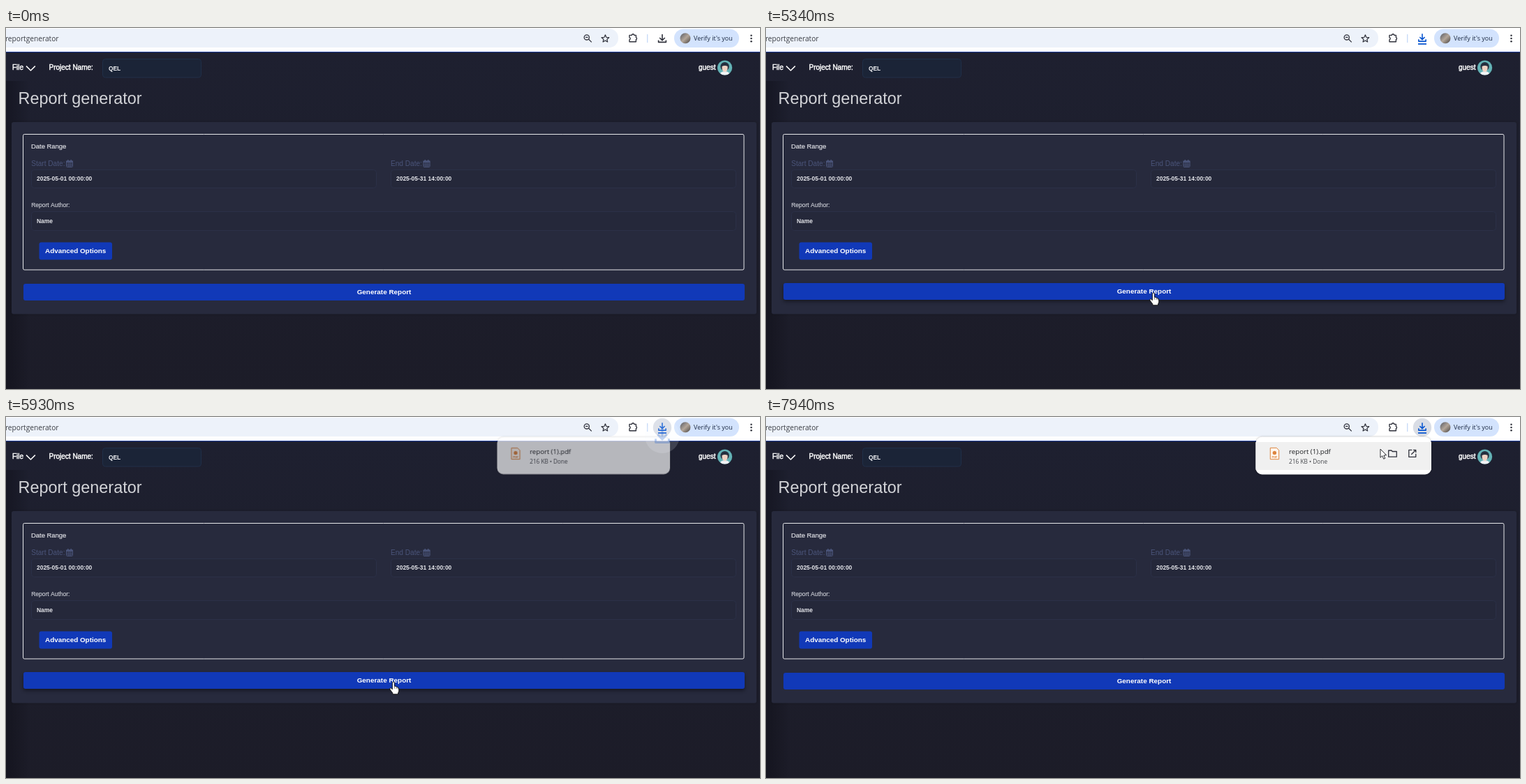
These frames come from a looping animation (1080x518 px, 8 s). An HTML page with a canvas:

```html
<!DOCTYPE html>
<html lang="en">
<head>
<meta charset="utf-8">
<title>Report generator</title>
<style>
  html, body { margin: 0; width: 100%; height: 100%; overflow: hidden; background: #1c1d29; }
  canvas { display: block; }
</style>
</head>
<body>
<canvas id="stage" width="1080" height="518"></canvas>
<script>
const W = 1080, H = 518, LOOP = 8000;
const ARIAL = '"Liberation Sans", Arial, sans-serif';
const UI = '"Open Sans", "Noto Sans", sans-serif';
const BLUE = '#0b57d0', INK = '#30323c', BUTTON = '#1139b8';

const stage = document.getElementById('stage').getContext('2d');
const pageLayer = makeLayer(), popLayer = makeLayer();
let g = stage;

function makeLayer() {
  const c = document.createElement('canvas');
  c.width = W;
  c.height = H;
  return c.getContext('2d');
}

// drawing helpers
function box(x, y, w, h, r, fill, stroke, lw = 1) {
  g.beginPath();
  g.roundRect(x, y, w, h, r);
  paint(fill, stroke, lw);
}
function disc(x, y, r, fill, stroke, lw) {
  g.beginPath();
  g.arc(x, y, r, 0, 7);
  paint(fill, stroke, lw);
}
function paint(fill, stroke, lw = 1) {
  if (fill) { g.fillStyle = fill; g.fill(); }
  if (stroke) { g.strokeStyle = stroke; g.lineWidth = lw; g.stroke(); }
}
function shape(d, x, y, s, fill, stroke, lw) {
  g.save();
  g.translate(x, y);
  g.scale(s, s);
  g.lineJoin = 'round';
  const p = new Path2D(d);
  if (fill) { g.fillStyle = fill; g.fill(p); }
  if (stroke) { g.strokeStyle = stroke; g.lineWidth = lw; g.stroke(p); }
  g.restore();
}
function text(str, x, y, font, color, { align = 'left', thick = 0 } = {}) {
  g.font = font;
  g.textAlign = align;
  g.fillStyle = color;
  g.fillText(str, x, y);
  if (thick) {
    g.strokeStyle = color;
    g.lineWidth = thick;
    g.strokeText(str, x, y);
  }
}

// timing helpers
const clamp = v => Math.max(0, Math.min(1, v));
const range = (a, b) => Array.from({ length: (b - a) / 100 + 1 }, (_, i) => a + i * 100);
const STEPS = [0, 1190, ...range(1310, 1710), ...range(5340, 5940), 6030, 6220,
  ...range(6340, 7340), ...range(7640, 7940)];
const snap = t => STEPS.reduce((a, s) => (s <= t ? s : a), 0);

function track(keys, t) {
  let i = 0;
  while (i < keys.length - 2 && t >= keys[i + 1][0]) i++;
  const [ta, xa, ya] = keys[i], [tb, xb, yb] = keys[i + 1];
  const p = clamp((t - ta) / (tb - ta));
  return [xa + (xb - xa) * p, ya + (yb - ya) * p];
}

const POINTER = [
  [1190, 600, 438], [1310, 576, 412], [1410, 562, 393], [1510, 556, 384], [1710, 555, 380],
  [6030, 555, 380], [6220, 574, 370], [6340, 628, 336], [6440, 690, 270], [6540, 735, 200],
  [6640, 762, 144], [6740, 775, 108], [6840, 779, 87], [6940, 779, 78], [7040, 779, 66],
  [7140, 779, 57], [7240, 779, 55], [7540, 779, 55], [7640, 793, 54], [7740, 829, 50],
  [7840, 862, 47], [7940, 880, 46]
];

function downloadIcon(x, y, s, color, lw = 1.6) {
  shape('M0-6V2.6M-3.8-1L0 2.8L3.8-1M-5.4 2.4V5.4H5.4V2.4', x, y, s, null, color, lw);
}

function toolbar() {
  g.fillStyle = '#fff';
  g.fillRect(0, 0, W, 34);
  box(-20, 1, 897, 27, 13, '#edf2fa');
  text('reportgenerator', 75.5, 19, `10.2px ${UI}`, '#3a3d44', { align: 'right' });

  disc(831.8, 13.4, 3.6, null, INK, 1.3);
  shape('M2.6 2.6L7 7M-1.8 0H1.8', 831.8, 13.4, 1, null, INK, 1.2);
  let star = 'M';
  for (let i = 0; i < 10; i++) {
    const a = i * Math.PI / 5, r = i % 2 ? 2.5 : 5.6;
    star += `${(r * Math.sin(a)).toFixed(2)} ${(-r * Math.cos(a)).toFixed(2)}${i < 9 ? 'L' : 'Z'}`;
  }
  shape(star, 858.4, 15.4, 1, null, INK, 1.2);
  shape('M-5-4H-1.6A1.7 1.7 0 0 1 1.8-4H4.4V-1A1.7 1.7 0 0 1 4.4 2.2V5.4H-5V2.4A1.8 1.8 0 0 0-5-1Z',
    898, 14.4, 1, null, INK, 1.4);
  g.fillStyle = '#c9dbf8';
  g.fillRect(918, 9, 1.4, 12);

  box(957, 1.5, 93, 26.5, 13.2, '#d3e3fd');
  const photo = g.createLinearGradient(966, 8, 980, 22);
  photo.addColorStop(0, '#5d6068');
  photo.addColorStop(0.5, '#b3a598');
  photo.addColorStop(1, '#4a4644');
  disc(973, 14.8, 7.5, photo);
  text("Verify it's you", 985, 18.2, `500 9.05px ${UI}`, '#1d2b45');
  for (const y of [10.8, 15, 19.2]) disc(1067.5, y, 1.25, INK);
}

function calendar(x, y) {
  const c = '#4a5479';
  box(x + 0.5, y + 1.5, 9, 8.5, 1, null, c);
  g.fillStyle = c;
  g.fillRect(x, y + 1, 10, 2.6);
  g.fillRect(x + 2, y - 0.5, 1.6, 3);
  g.fillRect(x + 6.4, y - 0.5, 1.6, 3);
  for (const d of [3, 5, 7]) g.fillRect(x + d - 0.3, y + 3, 0.7, 7);
  for (const d of [5.4, 7.6]) g.fillRect(x, y + d, 10, 0.7);
}

function avatar() {
  g.save();
  disc(1029.6, 57, 10.6, '#63b2b5');
  g.clip();
  shape('M-8 12Q-7 5 0 5Q7 5 8 12Z', 1029.6, 57, 1, '#f0f2f4');
  disc(1029.6, 55.2, 6.2, '#25303f');
  shape('M-4-1Q0-3 4-1V2Q3.5 6.5 0 7Q-3.5 6.5-4 2Z', 1029.6, 56, 1, '#efd3c4');
  g.restore();
}

function field(x, y, w, h, value) {
  box(x + 0.5, y + 0.5, w, h, 4, '#25283a', '#2b3047');
  text(value, x + 8, y + h / 2 + 3.2, `bold 8.45px ${ARIAL}`, '#e4e5ea');
}

function page() {
  const bg = g.createLinearGradient(0, 34, 0, H);
  bg.addColorStop(0, '#1e2030');
  bg.addColorStop(1, '#1c1c28');
  g.fillStyle = bg;
  g.fillRect(0, 0, W, H);
  const edge = g.createLinearGradient(0, 0, 34, 0);
  edge.addColorStop(0, 'rgba(10,10,18,.42)');
  edge.addColorStop(1, 'rgba(10,10,18,0)');
  g.fillStyle = edge;
  g.fillRect(0, 76, 34, H - 76);
  toolbar();
  g.fillStyle = '#1c3b9b';
  g.fillRect(0, 34, W, 1);

  const nav = `10px ${ARIAL}`;
  text('File', 9, 60.3, nav, '#fff', { thick: 0.45 });
  shape('M0 0L6.4 6.4L12.8 0', 29, 54.6, 1, null, '#fff', 1.5);
  text('Project Name:', 61.5, 60.3, nav, '#fff', { thick: 0.45 });
  box(138.5, 44.5, 141, 26.5, 4, '#1b2437', '#202f48');
  text('QEL', 147, 61, `bold 8.4px ${ARIAL}`, '#f0f1f4');
  text('guest', 1016.5, 60.3, nav, '#fff', { align: 'right', thick: 0.45 });
  avatar();
  text('Report generator', 17.6, 109.4, `23.4px ${ARIAL}`, '#d3d4d8');

  g.save();
  g.shadowColor = 'rgba(0,0,0,.2)';
  g.shadowBlur = 5;
  box(8, 135, 1067, 275.5, 3, '#272a3d');
  g.restore();
  box(24.5, 152.5, 1032.5, 194.5, 2, null, '#e6e7ea');
  text('Date Range', 36, 173, `9.45px ${ARIAL}`, '#dfe0e5', { thick: 0.2 });
  const label = `10.1px ${ARIAL}`;
  text('Start Date:', 36.2, 198, label, '#4a5479');
  calendar(86, 189.5);
  text('End Date:', 551, 198, label, '#4a5479');
  calendar(597.5, 189.5);
  field(36, 203, 494, 26, '2025-05-01 00:00:00');
  field(551, 203, 494, 26, '2025-05-31 14:00:00');
  text('Report Author:', 36.2, 256.8, `8.5px ${ARIAL}`, '#c6c8d0', { thick: 0.2 });
  field(36, 263, 1009, 27, 'Name');
  box(47.5, 307.5, 104.5, 25, 3, BUTTON);
  text('Advanced Options', 56, 322.5, `bold 9.9px ${ARIAL}`, '#fff');
}

function generateButton(lift) {
  g.save();
  if (lift) {
    g.shadowColor = `rgba(0,0,0,${0.4 * lift})`;
    g.shadowBlur = 5;
    g.shadowOffsetY = 3;
  }
  box(25, 367 - lift, 1033, 24, 3, BUTTON);
  g.restore();
  text('Generate Report', 541.5, 382 - lift, `bold 9.93px ${ARIAL}`, '#fff', { align: 'center' });
}

function popup(hover) {
  g.clearRect(0, 0, W, H);
  g.save();
  g.shadowColor = 'rgba(0,0,0,.3)';
  g.shadowBlur = 3;
  box(701.5, 28.5, 251.5, 54, 9, '#fff');
  g.restore();
  if (hover) {
    const v = Math.round(255 - 15 * hover);
    g.fillStyle = `rgb(${v},${v},${v})`;
    g.fillRect(701.5, 36, 251.5, 40);
  }
  const orange = '#dd853f';
  shape('M0 0H9L12.4 3.4V16.4H0Z', 722.3, 44.3, 1, '#fff6ee', orange, 1);
  disc(728.4, 51.4, 2.7, orange);
  text('PDF', 728.5, 59, `bold 4px ${ARIAL}`, orange, { align: 'center' });
  text('report (1).pdf', 749, 53.2, `500 9.7px ${UI}`, '#1f2023');
  text('216 KB • Done', 749, 66.6, `8.3px ${UI}`, '#46484d');
  if (hover) {
    shape('M0 0H4.2L5.6 1.5H11.6V9.2H0Z', 891.7, 48, 1, null, INK, 1.3);
    shape('M4.5 0H0V10H10V5.5M6.3 0H10V3.7M10 0L3.5 6.5', 920.8, 47.3, 1, null, INK, 1.3);
  }
}

function pointer(t) {
  const [x, y] = track(POINTER, t);
  if (y <= 391 && y >= 366) {
    shape('M-1.7 1.4Q-1.7 0 0 0Q1.6 0 1.6 1.5V6.6Q4 5.8 4.3 7.6Q6.4 7 6.4 8.8Q8 8.4 8 10.2V13Q8 15 6.8 16.2V18.4H-1.2V16.6L-4.9 11.6Q-6 9.8-4.8 9.2Q-3.6 8.7-1.7 11Z',
      x, y, 0.97, '#fff', '#111', 1);
    shape('M1.6 7V10M4.3 8V10.4M6.4 9V10.8', x, y, 0.97, null, '#444', 0.7);
  } else {
    shape('M0 0V12.2L2.8 9.7L4.7 14.2L6.8 13.3L4.9 9L8.6 8.7Z', x, y, 1, '#fff', '#16171c', 0.9);
  }
}

function flyingIcon(t) {
  const p = (t - 5440) / 400;
  if (p < 0 || p > 1) return;
  const y = 431 - 404 * (1 - Math.pow(1 - p, 1.85));
  g.save();
  g.globalAlpha = Math.sin(Math.PI * (0.15 + 0.8 * p));
  disc(940, y, 25, '#f1f4fa');
  g.globalAlpha = Math.min(1, g.globalAlpha + 0.1);
  downloadIcon(940, y, 1.75, BLUE, 1.7);
  g.restore();
}

function draw(time) {
  const t = snap(time);
  g = stage;
  g.drawImage(pageLayer.canvas, 0, 0);

  const lift = t < 6220 ? clamp((t - 1310) / 200) : clamp((6440 - t) / 200);
  generateButton(lift);

  if (t < 5340) {
    downloadIcon(940, 15, 1, INK);
  } else {
    if (t >= 5840) disc(940, 15, 13.2, '#d9dde5');
    downloadIcon(940, 14, 0.95, BLUE, 1.7);
    g.fillStyle = BLUE;
    g.fillRect(934, 22, 12, 1.8);
  }

  const show = track([[5640, 0, 0.94], [5740, 0.2, 0.96], [5840, 0.68, 0.985], [6030, 1, 1]], t);
  if (show[0] > 0) {
    g = popLayer;
    popup(clamp((t - 6940) / 300));
    g = stage;
    g.save();
    g.globalAlpha = show[0];
    if (show[1] < 1) {
      g.translate(827, 55);
      g.scale(show[1], show[1]);
      g.translate(-827, -55);
    }
    g.drawImage(popLayer.canvas, 0, 0);
    g.restore();
  }
  flyingIcon(t);
  if (t >= 1190) pointer(t);
}

g = pageLayer;
page();

const start = performance.now();
function tick() {
  draw((performance.now() - start) % LOOP);
  requestAnimationFrame(tick);
}
tick();
</script>
</body>
</html>
```
